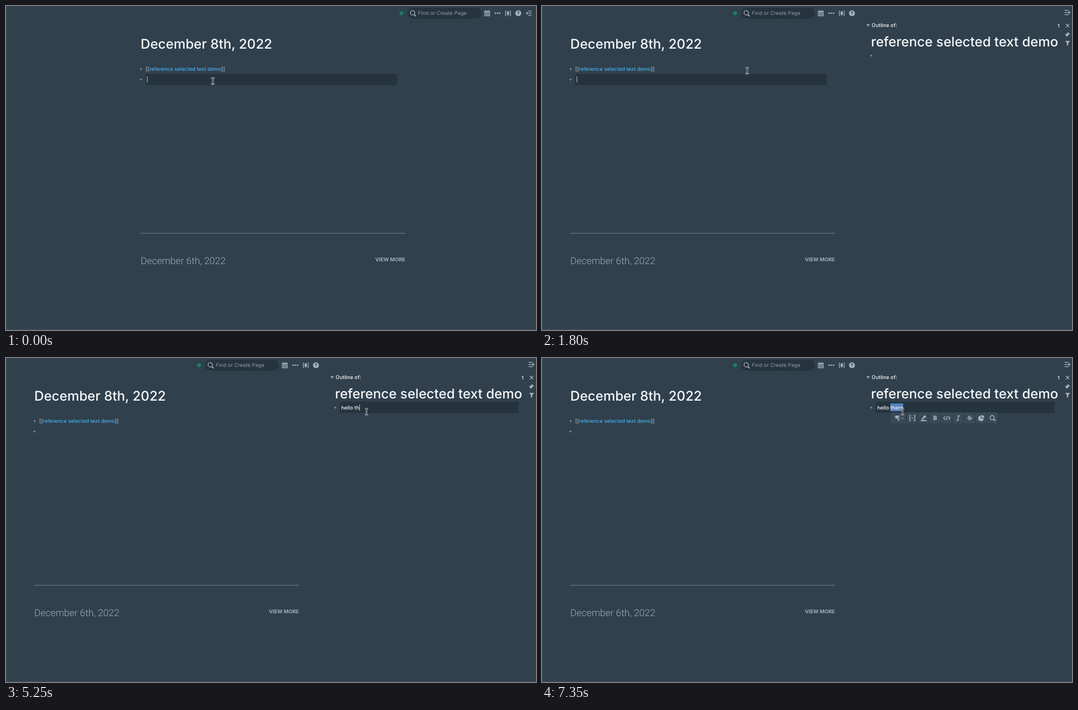
An HTML page that plays this animation: 957 by 585 pixels, repeating every 8 s.

```html
<!DOCTYPE html>
<html lang="en">
<head>
<meta charset="utf-8">
<title>Outline notes</title>
<style>
  html, body { margin: 0; width: 100%; height: 100%; overflow: hidden; background: #30404d; }
  svg { display: block; width: 957px; height: 585px; font: 500 9.28px Inter, sans-serif; font-optical-sizing: none; }
  text { white-space: pre; fill: #f5f8fa; text-rendering: geometricPrecision; }
  .title { font-size: 24.15px; }
  .old { font: 300 17.42px Roboto, sans-serif; fill: #a0aeb9; }
  .muted { font-weight: 400; font-size: 9.36px; fill: #8a9ba8; }
  .bold { font-weight: 700; font-size: 9.25px; fill: #a0aeb9; }
  .link { fill: #48aff0; }
  .field { fill: #26343e; stroke: #212e37; }
  .bullet { fill: #768693; }
  .icon { fill: #a7b6c2; }
  .line { fill: none; stroke: #a7b6c2; stroke-width: 1.3; }
  .caret { fill: #c3ccd2; }
</style>
</head>
<body>
<svg viewBox="0 0 957 585">
  <defs>
    <path id="beamShape" d="M-3 -5.5Q0 -5.5 0 -3.6Q0 -5.5 3 -5.5M0 -3.6V3.6M-3 5.5Q0 5.5 0 3.6Q0 5.5 3 5.5M-1.7 1.7H1.7"/>
  </defs>
  <path d="M0 0H2V583H957V585H0Z" fill="#384856"/>

  <g id="bar">
    <circle cx="714" cy="13" r="3.6" fill="#1b7f5b"/>
    <rect x="724.5" y="3" width="134" height="20" rx="10" fill="#26343e"/>
    <g class="line"><circle cx="734" cy="12.3" r="4"/><path d="M737 15.5L740 18.5" stroke-width="1.8"/></g>
    <text class="muted" x="744" y="16.4">Find or Create Page</text>
    <path class="line" d="M864.3 9.2H873.3V17.6H864.3ZM864 10.2H873.6" style="stroke-width:1.1"/>
    <path class="line" d="M866.3 7.5V9.5M871.3 7.5V9.5M867.3 10V17.5M870.3 10V17.5M864.3 12.6H873.3M864.3 15.1H873.3" style="stroke-width:.9"/>
    <g class="icon"><circle cx="883.7" cy="13" r="1.4"/><circle cx="887.7" cy="13" r="1.4"/><circle cx="891.7" cy="13" r="1.4"/></g>
    <path class="icon" d="M901.6 8h1.3v10.5h-1.3ZM904.7 9.5h3.6v7h-3.6ZM910.2 8h1.3v10.5h-1.3Z"/>
    <circle class="icon" cx="925" cy="13" r="5.3"/>
    <text x="925" y="16.2" text-anchor="middle" style="fill:#30404d;font-weight:800;font-size:8.6px">?</text>
  </g>
  <g id="openMenu">
    <path class="line" d="M943 9.2H949M943 13H949M943 16.8H949"/>
    <path class="icon" d="M942 10V16L938.6 13Z"/>
  </g>

  <g id="page">
    <text class="title" x="243" y="76.6">December 8th, 2022</text>
    <circle class="bullet" cx="243.5" cy="114" r="1.8"/>
    <circle class="bullet" cx="243.5" cy="132.7" r="1.8"/>
    <text x="252" y="117.3" style="fill:#a7b6c2">[[<tspan class="link" id="link">reference selected text demo</tspan>]]</text>
    <g id="pageField">
      <rect class="field" x="252.5" y="123.5" width="453" height="18.5" rx="1.5"/>
      <rect class="caret" id="pageCaret" x="254.5" y="127" width="1" height="11"/>
    </g>
    <path d="M243 410.3H721" stroke="#71818e"/>
    <text class="old" x="243" y="466">December 6th, 2022</text>
    <text class="bold" x="721" y="460.5" text-anchor="end">VIEW MORE</text>
  </g>

  <g id="side">
    <path class="line" d="M943.5 7.7H951M943.5 11.7H951M943.5 15.7H951"/>
    <path class="icon" d="M951 8.7V14.7L954.3 11.7Z"/>
    <path class="icon" d="M585.8 33H592L588.9 36.8Z"/>
    <text x="595.3" y="37.7">Outline of:</text>
    <text x="930.8" y="38.5">1</text>
    <path class="line" d="M945.8 32.2L952.2 38.6M952.2 32.2L945.8 38.6"/>
    <path class="icon" d="M949.4 47L953.4 51L952.3 51.7L951.2 51.3L949.6 53L949.9 54.9L949 55.7L947.1 53.7L944.2 55.9L946.4 53L944.5 51.1L945.4 50.2L947.4 50.5L949 48.8L948.7 47.8Z"/>
    <path class="icon" d="M944.5 63H953.5L950.3 66.8V70.2L947.8 72V66.8Z"/>
    <text class="title" x="594" y="73.4">reference selected text demo</text>
    <circle class="bullet" cx="594.5" cy="89.5" r="1.8"/>
    <g id="sideField">
      <rect class="field" x="603.5" y="80" width="321" height="18.5" rx="1.5"/>
      <rect id="selection" y="82" height="14" fill="#5584bd"/>
      <text id="typed" x="605.3" y="92.7"></text>
      <rect class="caret" id="sideCaret" y="84" width="1" height="11"/>
    </g>
    <text id="ruler" x="605.3" y="92.7" visibility="hidden">hello there</text>
  </g>

  <g id="tools">
    <rect width="194.4" height="21" rx="2" fill="#2a3944"/>
    <g id="keys" fill="#3a4b58"></g>
    <path class="icon" d="M11 6H17V7.2H16.2V15H15V7.2H14V15H12.8V11.2H11A2.6 2.6 0 0 1 11 6Z"/>
    <path class="line" d="M19.7 9.7L22 12L24.3 9.7" style="stroke:#72828f"/>
    <g transform="translate(.5 0)">
      <path class="line" d="M36.4 6H34.4V15H36.4M41.6 6H43.6V15H41.6"/>
      <path class="line" d="M36.6 10.5H41.6" stroke-dasharray="1.2 .6"/>
      <path class="icon" d="M54.4 14H64.4V16H54.4ZM55.6 12.8L57.6 9L60.4 11.8L58.1 13ZM58.3 8.4L61.1 5L64.3 8L61 11.1Z"/>
      <text x="80.3" y="14.4" text-anchor="middle" style="fill:#a7b6c2;font-weight:800;font-size:10.5px">B</text>
      <path class="line" d="M98.3 7.5L95.6 10.5L98.3 13.5M104.3 7.5L107 10.5L104.3 13.5M102.2 6.5L100.4 14.5"/>
      <path class="line" d="M120.8 6.5H125M118.8 14.5H123M123 6.5L120.8 14.5"/>
      <text x="142.7" y="14.3" text-anchor="middle" style="fill:#a7b6c2;font-weight:600;font-size:10.5px">S</text>
      <path class="line" d="M138 10.5H147.5"/>
      <path class="icon" d="M162.7 5.8A5.1 5.1 0 1 0 168.2 11.2H162.7ZM164 4.8A5.2 5.2 0 0 1 169 9.9H164Z"/>
      <g class="line"><circle cx="183.3" cy="9.8" r="3.8"/><path d="M186 12.5L189 15.5" stroke-width="1.8"/></g>
    </g>
  </g>

  <g id="pointer">
    <g id="beam" fill="none">
      <use href="#beamShape" stroke="#e6ebee" stroke-width="2.2"/>
      <use href="#beamShape" stroke="#20272c"/>
    </g>
    <path id="hand" d="M-1.8 .8Q-1.4 -.6 -.3 .2L1 3.4Q2 2.6 2.8 3.5Q3.8 2.9 4.3 4Q5.4 3.7 5.6 5L5.3 7.7L4.3 10H-.7L-2.6 7.6L-4.4 5.6Q-4.2 4.2 -2.8 4.8L-.9 6Z" fill="#fff" stroke="#1c2226" stroke-width=".8" stroke-linejoin="round"/>
  </g>
</svg>
<script>
const LOOP = 8000, STEP = 150;
const $ = id => document.getElementById(id);
const show = (id, on) => $(id).style.display = on ? '' : 'none';
const move = (id, x, y = 0) => $(id).setAttribute('transform', `translate(${x} ${y})`);
const words = 'hello there';

// [time, letters typed] and [time, first selected letter]
const typing = [[0, 0], [3600, 1], [3900, 2], [4200, 3], [4350, 4], [4650, 5], [4800, 6],
  [5100, 7], [5250, 8], [5400, 10], [5550, 11]];
const selecting = [[0, 11], [6450, 10], [6750, 9], [6900, 8], [7200, 7], [7350, 6]];
// [time, x, y]
const path = [[0, 373.5, 135.3], [300, 373.5, 135.3], [1200, 370.5, 116.8],
  [1950, 370.5, 116.8], [2550, 651, 96.8], [LOOP, 651, 96.8]];

const latest = (list, t) => list.filter(k => k[0] <= t).pop()[1];
const edge = n => 605.3 + (n ? $('ruler').getSubStringLength(0, n) : 0);
const within = (t, a, b) => t >= a && t < b;

function pointerAt(t) {
  const i = path.findIndex(k => k[0] > t);
  const [t0, x0, y0] = path[i - 1], [t1, x1, y1] = path[i];
  const u = (t - t0) / (t1 - t0), e = u * u * (3 - 2 * u);
  return [x0 + (x1 - x0) * e, y0 + (y1 - y0) * e];
}

function draw(time) {
  const t = Math.floor(time % LOOP / STEP) * STEP;
  const open = t >= 1650, focus = t >= 2700;
  move('bar', open ? -365.3 : 0);
  move('page', open ? -192 : 0);
  show('openMenu', !open);
  show('side', open);
  show('pageField', !focus);
  show('pageCaret', !within(t, 600, 1050));
  show('sideField', focus);

  const [x, y] = pointerAt(t);
  const hover = y < 121 && t < 1800;
  move('pointer', x, y);
  show('hand', hover);
  show('beam', !hover);
  $('link').style.textDecoration = hover && !open ? 'underline' : '';

  const count = latest(typing, t), from = latest(selecting, t);
  $('typed').textContent = words.slice(0, count);
  if (open) {
    const left = edge(from);
    $('sideCaret').setAttribute('x', edge(count) + .2);
    $('selection').setAttribute('x', left);
    $('selection').setAttribute('width', edge(words.length) - left);
    move('tools', left, 98);
  }
  show('sideCaret', !within(t, 3150, 3600) && t < 6000);
  show('selection', t >= 6450);
  show('tools', t >= 6600);
}

for (let i = 0; i < 9; i++) {
  const key = document.createElementNS('http://www.w3.org/2000/svg', 'rect');
  const box = { x: i ? 8.6 + i * 20.7 : .5, y: .5, width: i ? 19.7 : 27.8, height: 20, rx: 1 };
  for (const k in box) key.setAttribute(k, box[k]);
  $('keys').append(key);
}

const start = performance.now();
function tick() {
  draw(performance.now() - start);
  requestAnimationFrame(tick);
}
tick();
</script>
</body>
</html>
```
